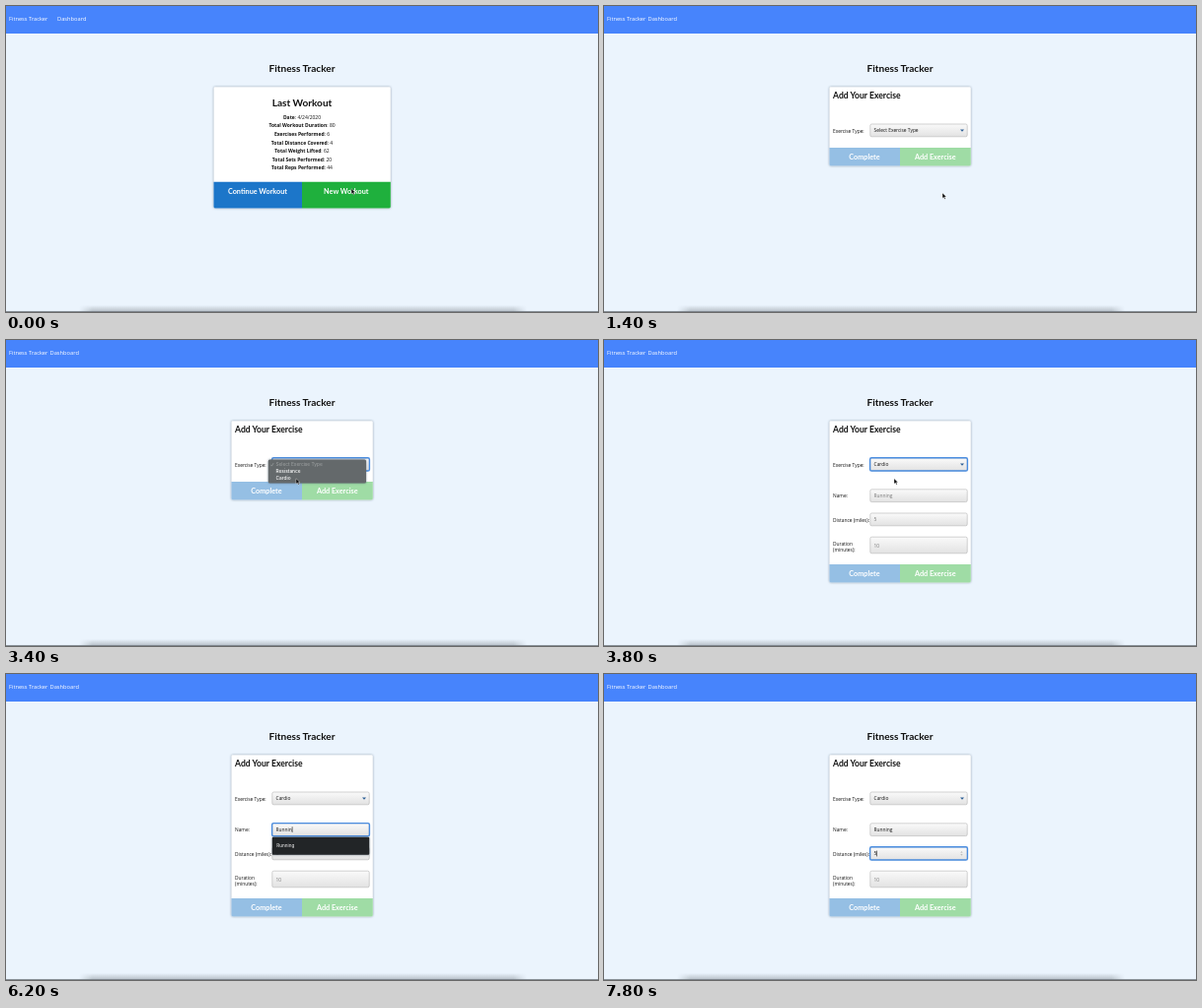
Write an HTML page that moves like this. It is 600 px wide and 311 px high and loops after 8 s.

```html
<!DOCTYPE html>
<html lang="en">
<head>
<meta charset="utf-8">
<title>Fitness Tracker</title>
<style>
  html, body { margin: 0; width: 100%; height: 100%; overflow: hidden; background: #ebf4fd; }
  svg { display: block; width: 100%; height: 100%; }
  text { font: 5px "Open Sans", sans-serif; fill: #111; white-space: pre; }
  .nav { font-size: 5.71px; fill: #fff; }
  .title, .head, .btn { font-family: Lato, sans-serif; font-weight: 700; }
  .title { font-size: 10.05px; }
  .head { font-size: 8.65px; }
  .btn { font-size: 7.25px; fill: #fff; }
  .mid { text-anchor: middle; }
  .b { font-weight: 700; }
  .label, .value { font-size: 4.87px; }
  .hint { fill: #777; }
  .menu text, .popup text { font: 500 4.8px Inter, sans-serif; fill: #fff; }
  .menu .off { fill: #9fa3a4; font-weight: 400; }
  .popup text { font-size: 4.6px; fill: #ddd; }
  .card { fill: #fff; filter: drop-shadow(0 .4px 1px rgba(60, 80, 100, .55)); }
  .field { fill: url(#face); stroke: #b4b4b4; stroke-width: .6; }
  .ring { fill: none; stroke: #4a8de0; stroke-width: 1.4; }
  .caret { fill: #111; }
  .arrow { fill: #2c5f96; }
</style>
</head>
<body>
<svg viewBox="0 0 600 311" preserveAspectRatio="none">
  <defs>
    <linearGradient id="face" x2="0" y2="1">
      <stop stop-color="#fafafa"/><stop offset="1" stop-color="#e2e2e2"/>
    </linearGradient>
    <linearGradient id="dock" x2="0" y2="1">
      <stop stop-color="#8f979e" stop-opacity="0"/><stop offset="1" stop-color="#8f979e" stop-opacity=".6"/>
    </linearGradient>
    <linearGradient id="ends">
      <stop stop-color="#000"/><stop offset=".03" stop-color="#fff"/>
      <stop offset=".97" stop-color="#fff"/><stop offset="1" stop-color="#000"/>
    </linearGradient>
    <mask id="soft"><rect x="74" y="300" width="454" height="11" fill="url(#ends)"/></mask>
  </defs>

  <rect width="600" height="311" fill="#ebf4fd"/>
  <rect width="600" height="28" fill="#4784fc"/>
  <rect x="74" y="304" width="454" height="7" fill="url(#dock)" mask="url(#soft)"/>
  <rect y="310.2" width="600" height=".8" fill="#747b82"/>
  <text class="title mid" x="300" y="67.4">Fitness Tracker</text>
  <text class="nav" x="3" y="14.7">Fitness Tracker</text>

  <!-- summary page -->
  <g data-show="0 1400">
    <text class="nav" x="52" y="14.7">Dashboard</text>
    <rect class="card" x="210.5" y="82.3" width="179.3" height="123.2" rx="1.4"/>
    <text class="title mid" x="300" y="101.6">Last Workout</text>
    <g id="stats"></g>
    <path d="M210.5 178.7H300V205.5H211.9Q210.5 205.5 210.5 204.1Z" fill="#1c76c9"/>
    <path id="newButton" d="M300 178.7H389.8V204.1Q389.8 205.5 388.4 205.5H300Z"/>
    <text class="btn mid" x="255" y="190.5">Continue Workout</text>
    <text class="btn mid" x="344.8" y="190.5">New Workout</text>
  </g>

  <!-- exercise form -->
  <g data-show="1400 8000">
    <text class="nav" x="44.5" y="14.7">Dashboard</text>
    <rect class="card" id="formCard" x="228.4" y="82.3" width="143.4" rx="1.4"/>
    <text class="head" x="232" y="94.4">Add Your Exercise</text>
    <g id="formButtons">
      <path d="M228.4 0H300V18.5H229.8Q228.4 18.5 228.4 17.1Z" fill="#95bfe4"/>
      <path d="M300 0H371.8V17.1Q371.8 18.5 370.4 18.5H300Z" fill="#9fdca5"/>
      <text class="btn mid" x="264" y="12.2">Complete</text>
      <text class="btn mid" x="335.8" y="12.2">Add Exercise</text>
    </g>

    <text class="label" x="232" y="128.5">Exercise Type:</text>
    <rect class="field" x="269.8" y="120" width="98.4" height="12.8" rx="1.6"/>
    <path class="arrow" d="M361 125.4h4l-2 2.4z"/>
    <text class="value" id="kind" x="273.6" y="128.3"></text>

    <g data-show="3800 8000">
      <text class="label" x="232" y="160">Name:</text>
      <rect class="field" x="269.8" y="151.8" width="98.4" height="12.8" rx="1.6"/>
      <text class="value" id="name" x="273.6" y="159.9"></text>
      <text class="label" x="232" y="184.5">Distance (miles):</text>
      <rect class="field" x="269.8" y="176" width="98.4" height="12.8" rx="1.6"/>
      <text class="value" id="distance" x="273.6" y="184.3"></text>
      <text class="label" x="232" y="208.8">Duration</text>
      <text class="label" x="232" y="215.2">(minutes):</text>
      <rect class="field" x="269.8" y="200.2" width="98.4" height="16.6" rx="1.6"/>
      <text class="value hint" x="273.6" y="210.6">10</text>
    </g>

    <rect class="ring" data-show="2000 4400" x="269.6" y="119.8" width="98.8" height="13.2" rx="1.6"/>
    <rect class="ring" data-show="4400 6800" x="269.6" y="151.6" width="98.8" height="13.2" rx="1.6"/>
    <g data-show="6800 8000">
      <rect class="ring" x="269.6" y="175.8" width="98.8" height="13.2" rx="1.6"/>
      <path d="M361.2 181.6l1.2-1.4 1.2 1.4zm0 1.6l1.2 1.4 1.2-1.4z" fill="#aaa"/>
    </g>
    <rect class="caret" id="caret" width=".6"/>

    <g class="menu" id="menu" data-show="2000 3800">
      <rect class="card" style="fill:#64696b" x="265.8" y="121.4" width="99.2" height="24.2" rx="1.6"/>
      <path d="M268.4 126.8l1 1.3 1.7-3" fill="none" stroke="#a5a9aa" stroke-width=".6"/>
      <text class="off" x="273.5" y="128.4">Select Exercise Type</text>
      <text x="273.5" y="135.1">Resistance</text>
      <text x="273.5" y="142">Cardio</text>
    </g>
    <g class="popup" id="popup" data-show="5400 7000">
      <rect class="card" style="fill:#222527" x="269.8" y="165.8" width="98.4" height="18" rx="1"/>
      <text x="274.3" y="176.3">Running</text>
    </g>
  </g>

  <g id="pointer" stroke-linejoin="round">
    <path id="shape-arrow" d="M0 0V5.4L1.3 4.3 2.2 6.3 3.2 5.9 2.3 3.9H4Z" fill="#000" stroke="#fff" stroke-width=".4"/>
    <path id="shape-hand" d="M-.5 0Q.2-.6.8 0V2.2L3 2.8Q3.6 3 3.4 4L2.8 6H-.2L-2 3.6Q-1.4 2.8-.5 3.6Z" fill="#fff" stroke="#000" stroke-width=".5"/>
    <path id="shape-beam" d="M-1-2.8Q0-2.8 0-2Q0-2.8 1-2.8M0-2V2M-1 2.8Q0 2.8 0 2Q0 2.8 1 2.8" fill="none" stroke="#222" stroke-width=".5"/>
  </g>
</svg>
<script>
const LOOP = 8000;
const $ = id => document.getElementById(id);

const stats = [
  ["Date", "4/24/2020"], ["Total Workout Duration", 80], ["Exercises Performed", 6],
  ["Total Distance Covered", 4], ["Total Weight Lifted", 62],
  ["Total Sets Performed", 20], ["Total Reps Performed", 44]
];
$("stats").innerHTML = stats.map(([label, value], i) =>
  `<text class="mid" x="300" y="${114.7 + i * 8.6}"><tspan class="b">${label}</tspan>: ${value}</text>`).join("");

// start time, x, y, shape
const pointerPath = [
  [0, 350, 185.6, "arrow"], [200, 347, 188, "arrow"], [400, 343, 190, "hand"],
  [1400, 343, 190, "arrow"], [1800, 324, 160, "arrow"], [2000, 303, 129, "arrow"],
  [2200, 302, 128.6, "arrow"], [2400, 301.5, 129.5, "arrow"], [2800, 300, 132, "arrow"],
  [3000, 298, 135.5, "arrow"], [3200, 295.5, 139, "arrow"], [3400, 294, 140.8, "arrow"],
  [4000, 292, 147, "arrow"], [4200, 290, 157, "beam"], [4400, 289, 159, "beam"],
  [5400, 0, 0, "none"]
];
// start time, typed text
const nameTyping = [
  [0, ""], [5400, "R"], [5600, "Ru"], [5800, "Run"], [6000, "Runn"], [6200, "Runnin"], [6400, "Running"]
];
const distanceTyping = [[0, ""], [7800, "5"]];

const timed = [...document.querySelectorAll("[data-show]")].map(el =>
  [el, ...el.dataset.show.split(" ").map(Number)]);
const within = (t, from, to) => t >= from && t < to;
const show = (el, on) => { el.style.display = on ? "" : "none"; };
const latest = (steps, t) => steps.filter(step => step[0] <= t).pop();

function fill(field, text, hint) {
  field.textContent = text || hint;
  field.classList.toggle("hint", !text);
}

function placeCaret(field, text, y, height) {
  const width = text ? field.getComputedTextLength() : 0;
  $("caret").setAttribute("x", 273.6 + width);
  $("caret").setAttribute("y", y);
  $("caret").setAttribute("height", height);
}

function draw(t) {
  for (const [el, from, to] of timed) show(el, within(t, from, to));
  $("newButton").setAttribute("fill", t < 1000 ? "#1fb03d" : "#15882c");

  const open = t >= 3800;
  $("formCard").setAttribute("height", open ? 164.2 : 80.2);
  $("formButtons").setAttribute("transform", `translate(0 ${open ? 228 : 144})`);
  $("kind").textContent = t < 3600 ? "Select Exercise Type" : "Cardio";
  $("menu").style.opacity = t < 3600 ? 1 : .5;
  $("popup").style.opacity = t < 6800 ? 1 : .3;

  const name = latest(nameTyping, t)[1];
  const distance = latest(distanceTyping, t)[1];
  fill($("name"), name, "Running");
  fill($("distance"), distance, "5");
  if (t < 6800) placeCaret($("name"), name, 155.2, 5.8);
  else placeCaret($("distance"), distance, 179.6, 5.8);
  show($("caret"), within(t, 4400, 5000) || within(t, 5400, 7400) || t >= 7800);

  const [, x, y, shape] = latest(pointerPath, t);
  $("pointer").setAttribute("transform", `translate(${x} ${y})`);
  for (const kind of ["arrow", "hand", "beam"]) show($("shape-" + kind), kind === shape);
}

const start = performance.now();
function tick() {
  draw((performance.now() - start) % LOOP);
  requestAnimationFrame(tick);
}
tick();
</script>
</body>
</html>
```
